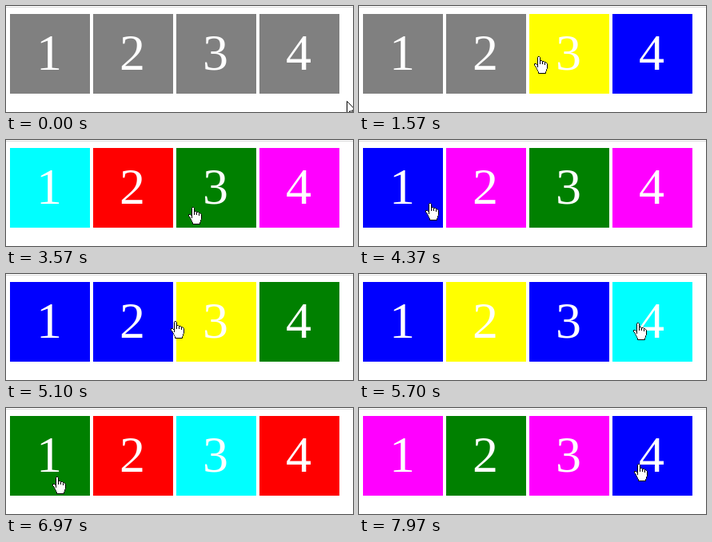
Recreate the animation shown at these times as an HTML page with a canvas. Size 434 by 133 pixels, loop 8000 ms.

```html
<!DOCTYPE html>
<html lang="en">
<head>
<meta charset="utf-8">
<title>Hover colours</title>
<style>
html, body { margin: 0; width: 100%; height: 100%; overflow: hidden; background: #fff; }
canvas { display: block; }
</style>
</head>
<body>
<canvas id="stage" width="434" height="133"></canvas>
<script>
const ctx = document.getElementById('stage').getContext('2d');
const LOOP = 8000, START = 500, SIZE = 100, TOP = 10;
const COLOURS = { r: '#f00', g: '#008000', b: '#00f', y: '#ff0', m: '#f0f', c: '#0ff' };

// Each box steps through its own repeating cycle whenever the pointer enters it.
const boxes = ['cbbrgm', 'cmrmbgy', 'ycrgmybg', 'bmgcry']
  .map((cycle, i) => ({ x: 5 + 104 * i, label: i + 1, cycle, entries: [] }));

// Places where the pointer turns or rests: time, x, y
const turns = [
  [430, 426, 119], [1300, 328, 66], [1904, 80, 62], [2150, 82, 60],
  [2580, 345, 76], [3234, 165, 104], [3450, 258, 85], [4000, 47, 82],
  [4370, 89, 80], [4870, 350, 62], [5358, 46, 58], [5710, 350, 62],
  [6240, 96, 64]
];
// Then steady sweeps between the outer boxes.
for (let k = 1; k <= 5; k++) {
  turns.push([6240 + 346 * k, ...(k % 2 ? [350, 71] : [55, 88])]);
}

function pointerAt(t) {
  if (t < START) return { x: turns[0][1], y: turns[0][2] };
  const next = turns.findIndex(turn => turn[0] > t);
  const i = next < 0 ? turns.length - 1 : next;
  const from = turns[i - 1], to = turns[i];
  const u = Math.min(1, (t - from[0]) / (to[0] - from[0]));
  const eased = (1 - Math.cos(Math.PI * u)) / 2;
  const mix = axis => Math.round(from[axis] + (to[axis] - from[axis]) * eased);
  return { x: mix(1), y: mix(2) };
}

function boxUnder({ x, y }) {
  return boxes.find(b => x >= b.x && x < b.x + SIZE && y >= TOP && y < TOP + SIZE);
}

let previous;
for (let t = START; t < LOOP; t += 10) {
  const box = boxUnder(pointerAt(t));
  if (box && box !== previous) box.entries.push(t);
  if (box) previous = box;
}
const firstHover = Math.min(...boxes.flatMap(b => b.entries));

// The picture advances fifteen times a second on a 10 ms clock.
function snap(t) {
  if (t < START) return 0;
  const step = Math.floor(Math.floor((t - START) / 10) * 0.15 + 1e-6);
  return START + Math.ceil(step * 20 / 3 - 1e-6) * 10;
}

const hand = new Path2D('M5 .5H6.5L7.5 1.5V5.5H9.5L10.5 6.5H12.5L13.5 7.5H14.5' +
  'L16.5 9.5V15.5L15.5 16.5V18.5L14.5 19.5V21.5H5.5V19.5L4.5 18.5V17.5' +
  'L3.5 16.5V15.5L2.5 14.5V13.5L.5 11.5V9.5H2.5L4.5 11.5V1.5Z');
const fingers = new Path2D('M7.5 5V10M10.5 6.5V10M13.5 7.5V11M4.5 11V14');
const arrow = new Path2D('M.5 .5V16.5L4.5 12.5L7 18.5H9L6.5 12H11.5Z');

function drawPointer({ x, y }, isHand) {
  const shape = isHand ? hand : arrow;
  ctx.save();
  ctx.translate(isHand ? x - 6 : x, isHand ? y - 1 : y);
  ctx.fillStyle = '#fff';
  ctx.strokeStyle = '#000';
  ctx.fill(shape);
  ctx.stroke(shape);
  if (isHand) ctx.stroke(fingers);
  ctx.restore();
}

function drawBox(box, t) {
  const count = box.entries.filter(entry => entry <= t).length;
  const key = box.cycle[(count - 1) % box.cycle.length];
  ctx.fillStyle = count ? COLOURS[key] : '#808080';
  ctx.fillRect(box.x, TOP, SIZE, SIZE);
  ctx.fillStyle = '#fff';
  ctx.fillText(box.label, box.x + SIZE / 2 - 1, 80);
}

function draw(t) {
  ctx.fillStyle = '#fff';
  ctx.fillRect(0, 0, 434, 133);
  ctx.fillStyle = '#ddd';
  ctx.fillRect(0, 1, 434, 1);
  ctx.font = '64px "Liberation Serif", serif';
  ctx.textAlign = 'center';
  boxes.forEach(box => drawBox(box, t));
  drawPointer(pointerAt(t), t >= firstHover);
}

const begin = performance.now();
function tick() {
  draw(snap((performance.now() - begin) % LOOP));
  requestAnimationFrame(tick);
}
tick();
</script>
</body>
</html>
```
